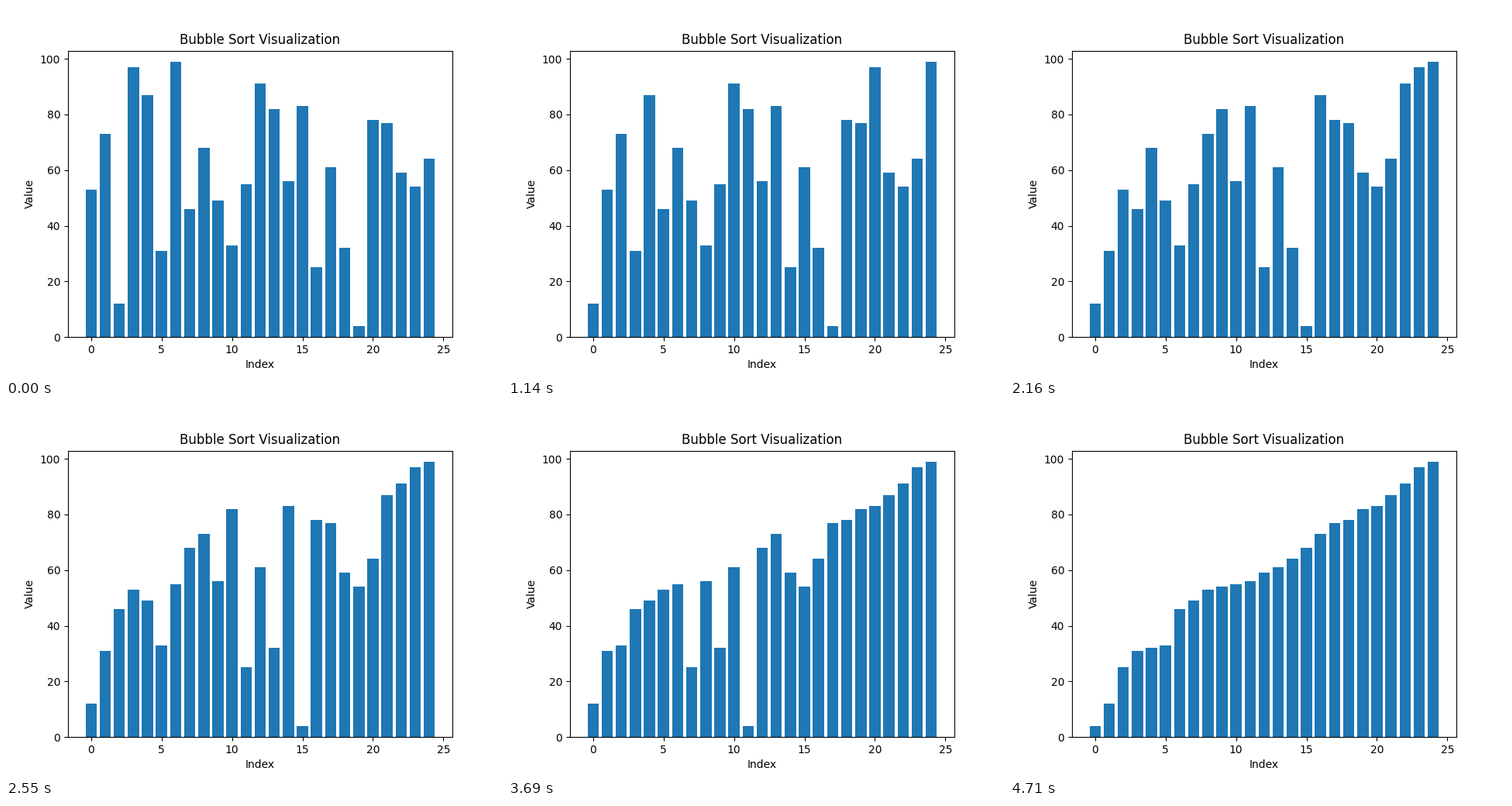
A matplotlib script that plays this animation: 640x480 px, repeating every 4740 ms.

```python
import matplotlib.pyplot as plt
from matplotlib.animation import FuncAnimation

# Unsorted input; everything else follows from the sort.
START = [53, 73, 12, 97, 87, 31, 99, 46, 68, 49, 33, 55, 91,
         82, 56, 83, 25, 61, 32, 4, 78, 77, 59, 54, 64]


def bubble_sort(values):
    """Yield the list before sorting and after every swap."""
    a = list(values)
    yield a[:]
    for end in range(len(a) - 1, 0, -1):
        for j in range(end):
            if a[j] > a[j + 1]:
                a[j], a[j + 1] = a[j + 1], a[j]
                yield a[:]


states = list(bubble_sort(START))

fig, ax = plt.subplots(figsize=(6.4, 4.8), dpi=100)
bars = ax.bar(range(len(START)), START, color="#1f77b4")
ax.set(title="Bubble Sort Visualization", xlabel="Index", ylabel="Value",
       ylim=(0, 102.9))


def update(i):
    for bar, height in zip(bars, states[i]):
        bar.set_height(height)
    return bars.patches


anim = FuncAnimation(fig, update, frames=len(states), interval=30,
                     repeat=True, repeat_delay=0, blit=False)
plt.show()
```
